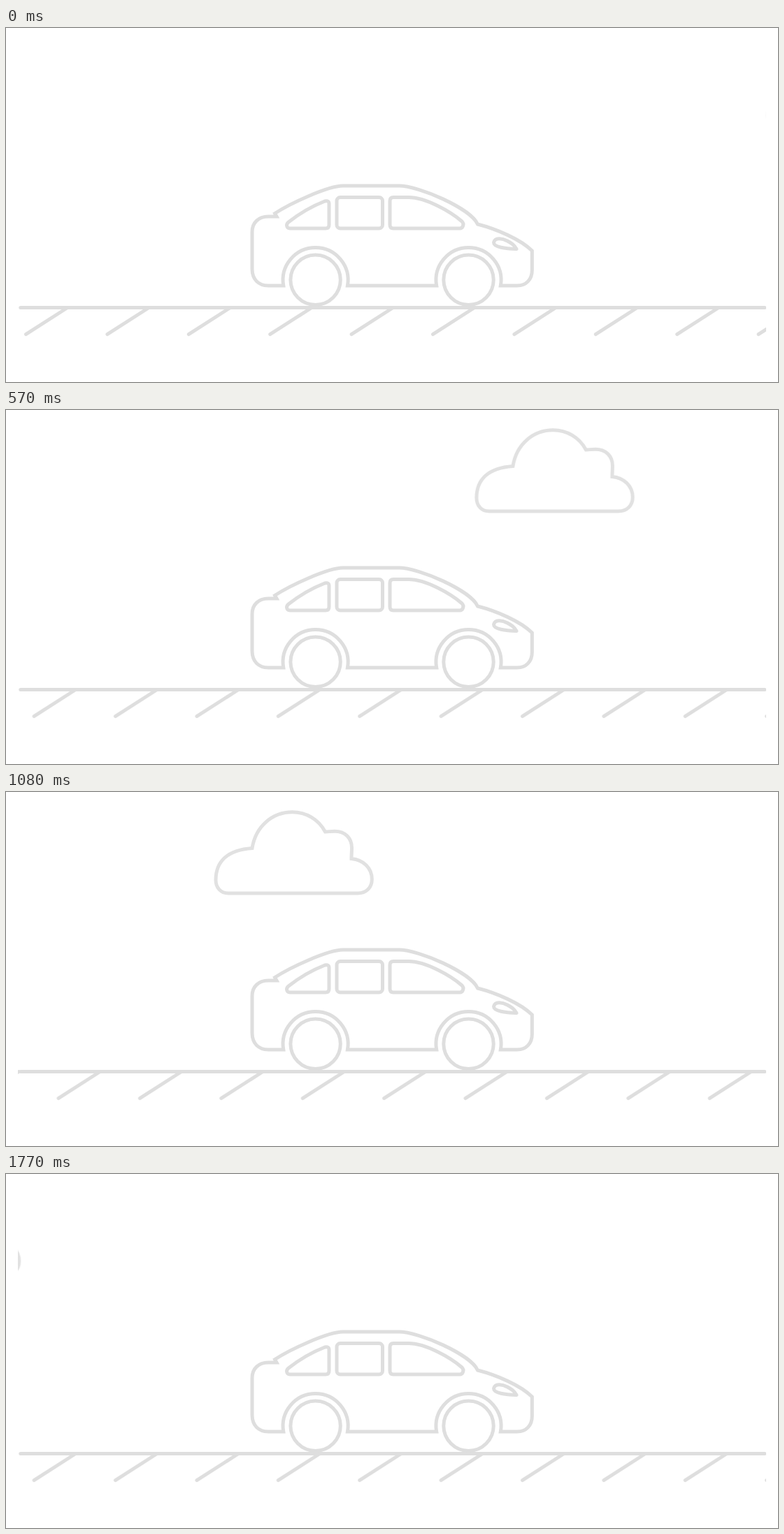
Recreate the animation shown at these times as an HTML page without scripts. Size 1104x507 px, loop 1.8 s.

```html
<!DOCTYPE html>
<html lang="en">
<head>
<meta charset="utf-8">
<title>Car on the road</title>
<style>
  html, body { margin: 0; width: 100%; height: 100%; overflow: hidden; background: #fff; }
  svg { display: block; width: 1104px; height: 507px; }
  .line { fill: none; stroke: #dedede; stroke-width: 5; stroke-linecap: round; }
  .cloud { stroke: #e1e1e1; animation: drift 1.8s steps(60) infinite; }
  .hatch { animation: roll .3s steps(10) infinite; }
  @keyframes drift {
    from { transform: translateX(1089.6px); }
    to { transform: translateX(-226.5px); }
  }
  @keyframes roll {
    to { transform: translateX(-116.4px); }
  }
</style>
</head>
<body>
<svg viewBox="0 0 1104 507">
  <defs>
    <clipPath id="view"><rect x="17" y="0" width="1070" height="507"/></clipPath>
    <path id="dash" d="M28.5 438.7L88 400.5"/>
    <g id="trio">
      <use href="#dash"/>
      <use href="#dash" x="116.4"/>
      <use href="#dash" x="232.8"/>
    </g>
  </defs>

  <g class="line" clip-path="url(#view)">
    <path class="cloud" d="M52 80.5C57 49 81 28.7 109.5 28.7C129 28.7 147 39 156.5 57
      C161 57 165 56.2 170 56.2C185 56.2 194.5 66 194.5 80C194.5 86 194 90 194 95.5
      C211 97 223.3 109 223.3 125C223.3 137 215 145 203 145H18C7 145 0 137 0 126
      C0 99 17 83 52 80.5Z"/>

    <g class="hatch">
      <use href="#trio" x="-116.4"/>
      <use href="#trio" x="232.8"/>
      <use href="#trio" x="582"/>
      <use href="#trio" x="931.2"/>
    </g>
    <path d="M20.8 400.5H1085"/>
  </g>

  <g class="line">
    <!-- body -->
    <path d="M387 270H375C361 270 352 279 352 292V345C352 360 361 369 375 369H396.8
      A46.5 46.5 0 1 1 488.4 369H615.7A46.5 46.5 0 1 1 707.3 369H731
      C744 369 752.3 360 752.3 347V319C736 303 702 288 674.5 281
      C664 258 590 226 562 226H482C460 226 405 252 384.5 265.5Z"/>
    <!-- windows -->
    <path d="M462 252V282Q462 287 457 287H406C401 287 400 281 404 278
      C418 267 438 255 456 248Q462 246.5 462 252Z"/>
    <rect x="473" y="242.5" width="65.5" height="44.5" rx="5"/>
    <path d="M549 247.5Q549 242.5 554 242.5H576C600 242.5 636 263 652 277
      C656 281 653 287 649 287H554Q549 287 549 282Z"/>
    <!-- headlight -->
    <path stroke-linejoin="round" d="M697.5 307C699 299.5 710 301 717 305
      C724 309 727 311 730 316.5C715 316 697 314 697.5 307Z"/>
    <!-- wheels -->
    <circle cx="442.6" cy="360.8" r="35.7"/>
    <circle cx="661.5" cy="360.8" r="35.7"/>
  </g>
</svg>
</body>
</html>
```
